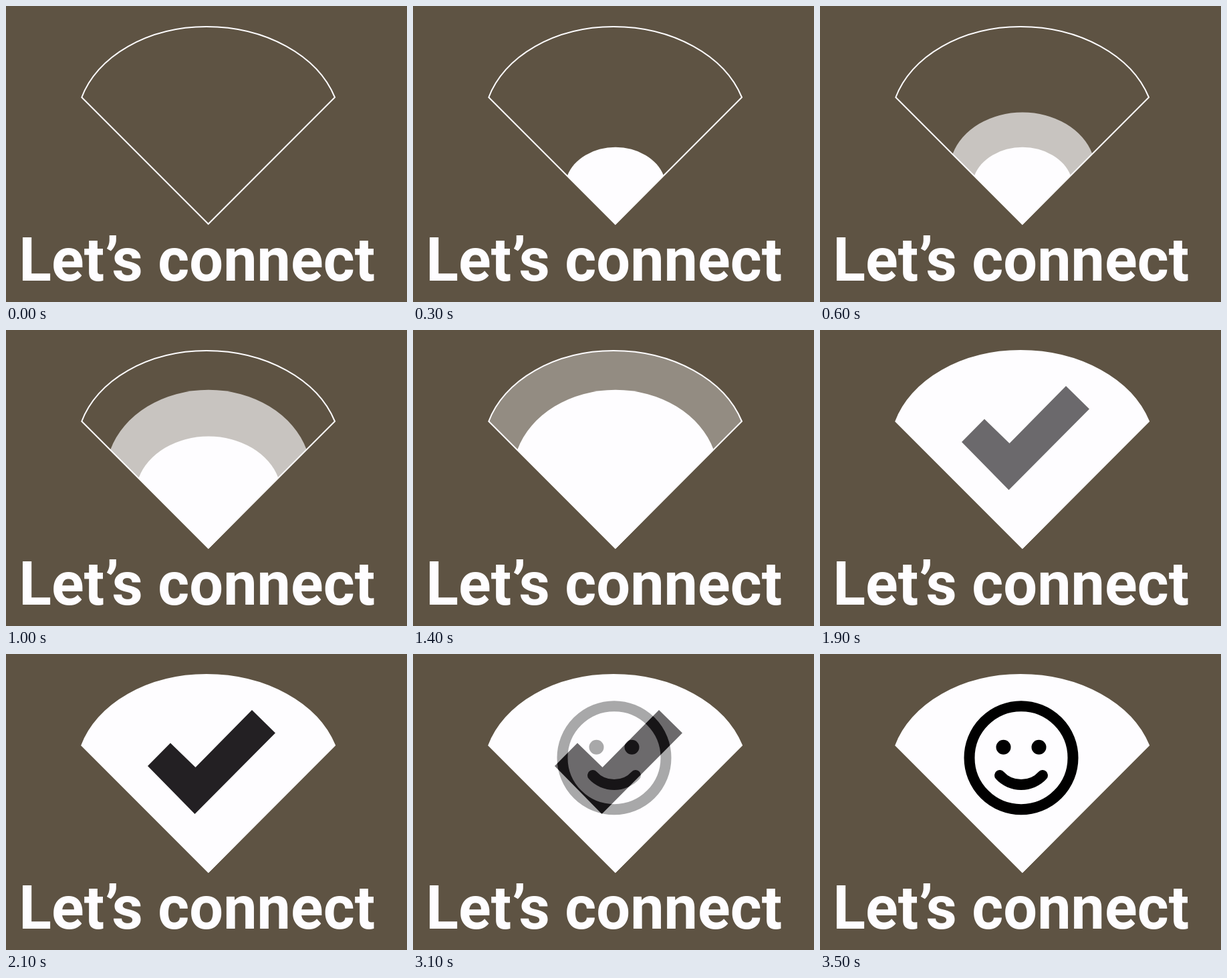
An HTML page that plays this animation: 600x444 px, repeating every 5400 ms.

```html
<!DOCTYPE html>
<html lang="en">
<head>
<meta charset="utf-8">
<title>Let’s connect</title>
<style>
  html, body { margin: 0; width: 100%; height: 100%; overflow: hidden; background: #5e5343; }
  svg { display: block; width: 600px; height: 444px; }
  text { font: 700 90px Roboto, sans-serif; fill: #fefdff; }
  .fan { fill: #fefdff; }
  .outline { fill: none; stroke: #fefdff; stroke-width: 2; }

  /* Each layer fades in over three 100 ms steps, then stays until the loop restarts. */
  .fade { opacity: 0; animation: 5400ms linear -2ms infinite; }
  .small  { animation-name: small; }
  .medium { animation-name: medium; }
  .large  { animation-name: large; }
  .full   { animation-name: full; }
  .check  { animation-name: check; }
  .face   { animation-name: face; }

  @keyframes small {
    0% { opacity: 0 }
    1.8519% { opacity: 0; animation-timing-function: steps(3, start) }
    7.4074%, 100% { opacity: 1 }
  }
  @keyframes medium {
    0% { opacity: 0 }
    9.2593% { opacity: 0; animation-timing-function: steps(3, start) }
    14.8148%, 100% { opacity: 1 }
  }
  @keyframes large {
    0% { opacity: 0 }
    16.6667% { opacity: 0; animation-timing-function: steps(3, start) }
    22.2222%, 100% { opacity: 1 }
  }
  @keyframes full {
    0% { opacity: 0 }
    25.9259% { opacity: 0; animation-timing-function: steps(3, start) }
    31.4815%, 100% { opacity: 1 }
  }
  @keyframes check {
    0% { opacity: 0 }
    33.3333% { opacity: 0; animation-timing-function: steps(3, start) }
    38.8889%, 100% { opacity: 1 }
  }
  @keyframes face {
    0% { opacity: 0 }
    57.4074% { opacity: 0; animation-timing-function: steps(3, start) }
    62.963%, 100% { opacity: 1 }
  }
</style>
</head>
<body>
<svg viewBox="0 0 600 444">
  <defs>
    <path id="wedge" d="M302.7 327 113.3 137A194 145 0 0 1 300 31A200.8 150 0 0 1 492 137Z"/>
    <path id="tick" d="M246 133.5 283.5 170 368 84 403 118.5 282.5 240 212 168Z"/>
  </defs>

  <path class="fan fade small" d="M303 328 231 254.5A75.2 60 0 0 1 375 254.5Z"/>
  <path class="fan fade medium" d="M303 328 198.5 222A109.2 88 0 0 1 407.5 222Z"/>
  <path class="fan fade large" d="M303 328 156 180A153.6 127 0 0 1 450 180Z"/>
  <use class="fan fade full" href="#wedge"/>
  <use class="outline" href="#wedge"/>

  <use class="fade check" href="#tick" fill="#232023"/>

  <g class="fade face">
    <use href="#tick" fill="#fefdff" stroke="#fefdff" stroke-width="3"/>
    <g fill="none" stroke="#000" stroke-width="16" stroke-linecap="round">
      <circle cx="301" cy="155.7" r="77.5"/>
      <path d="M269 182C277 191 289 196 301 196S325 191 333 182"/>
    </g>
    <circle cx="274.5" cy="139.7" r="11"/>
    <circle cx="327.5" cy="139.7" r="11"/>
  </g>

  <text x="19.3" y="411.5">Let’s connect</text>
</svg>
</body>
</html>
```
